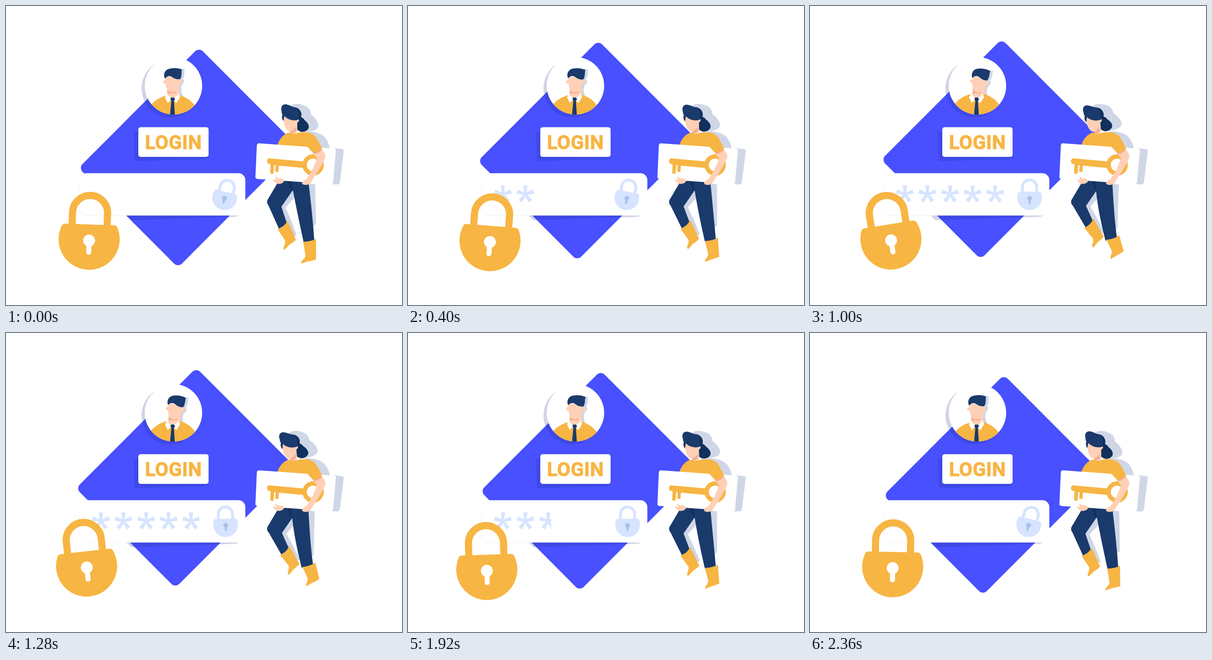
Recreate the animation shown at these times as an HTML page. Size 862 px wide and 650 px high, loop 2400 ms.

```html
<!DOCTYPE html>
<html lang="en">
<head>
<meta charset="utf-8">
<title>Login</title>
<style>
  html, body { margin: 0; width: 100%; height: 100%; overflow: hidden; background: #fff; }
  svg { display: block; width: 100%; height: 100%; }
  .shade { fill: #cfd6e6; }
  .cast { fill: rgba(20, 40, 120, .2); }
  .blue { fill: #4850ff; }
  .gold { fill: #f7b543; }
  .navy { fill: #1a3a6c; }
  .dark { fill: #10305d; }
  .skin { fill: #ffd0b5; }
  .blush { fill: #f8ab8a; }
  .white { fill: #fff; }
  .pale { fill: #d6e4ff; }
  .word { font: bold 42px Roboto, sans-serif; letter-spacing: .6px; stroke: #f7b543; stroke-width: 1; }
  #lock { color: #f7b543; --hole: #fff; }
  #mini { color: #d6e4ff; --hole: #a9c1ea; }
</style>
</head>
<body>
<svg viewBox="0 0 862 650">
  <defs>
    <clipPath id="disc"><circle cx="364.5" cy="173.5" r="62.5"/></clipPath>
    <clipPath id="typed"><rect id="reveal" x="170" y="380" width="0" height="60"/></clipPath>
    <g id="star" class="pale">
      <path id="arm" d="M-2.2 1L-4.6 -19H4.6L2.2 1Z"/>
      <use href="#arm" transform="rotate(72)"/>
      <use href="#arm" transform="rotate(144)"/>
      <use href="#arm" transform="rotate(216)"/>
      <use href="#arm" transform="rotate(288)"/>
    </g>
    <g id="padlock">
      <path d="M-38.2 -28V-56.5A38.2 38.2 0 0 1 38.2 -56.5V-28" fill="none" stroke="currentColor" stroke-width="15.5"/>
      <path d="M-53 -31.5H53Q59 -31.5 61 -26A66.5 66.5 0 1 1 -61 -26Q-59 -31.5 -53 -31.5Z" fill="currentColor"/>
      <g style="fill:var(--hole);stroke:var(--hole)">
        <circle cy="3.5" r="13" stroke="none"/>
        <path d="M0 8V29" stroke-width="11" stroke-linecap="round"/>
      </g>
    </g>
  </defs>

  <g id="tile">
    <rect class="blue" x="-153" y="-185.25" width="306" height="370.5" rx="12" transform="translate(397.25 329.25) rotate(45)"/>
  </g>

  <!-- avatar -->
  <circle class="cast" cx="358" cy="179" r="63"/>
  <circle class="white" cx="364.5" cy="173.5" r="62.5"/>
  <g clip-path="url(#disc)">
    <g id="face">
      <path class="shade" d="M360 137L389 137C387 144 390 152 385 159C390 162 387 169 383 171C380 178 381 188 386 196L392 215H362Z"/>
      <path class="skin" d="M351 176H377L377 198L363 206L351 198Z"/>
      <path class="blush" d="M351 181Q357 190 371 185L367 192H351Z"/>
      <circle class="skin" cx="346" cy="165.500" r="3.800"/>
      <circle class="skin" cx="379.500" cy="165.500" r="3.800"/>
      <path class="skin" d="M346 154L348 173Q351 188 362 188Q374 187 377 171L380 154Z"/>
      <path class="navy" d="M346 158C343 152 343 143 351 138C360 134 374 134 383 138C381 143 384 152 379 159C372 160 366 158 361 154C355 151 350 153 346 158Z"/>
    </g>
    <g id="suit">
      <path class="gold" d="M300 245C310 215 325 202 347 195L362 203L378 194C398 200 413 211 426 245Z"/>
    </g>
    <path class="skin" d="M351 190H376L363 203Z"/>
    <path class="white" d="M351 192L346 198L352 211L361 202L371 211L379 198L376 190Q371 198 363 200Q356 199 351 192Z"/>
    <path class="navy" d="M359 199H366L368 203L365.500 206L367.500 237H357L360 206L358 203Z"/>
  </g>

  <!-- button -->
  <path class="cast" d="M288 273L283 273Q279 274 279 278L281 337L434 333Q440 331 440 327L288 327Z"/>
  <rect class="white" x="288" y="263.500" width="153" height="64.500" rx="5"/>
  <text class="word gold" x="302.500" y="310.800">LOGIN</text>

  <!-- password field -->
  <path class="cast" d="M262 455L273 465.500L494 458.500Q505 458 509 454Z"/>
  <rect class="white" x="160" y="363.500" width="361" height="92" rx="15"/>
  <path d="M160 380V440Q160 455.500 176 455.500H262" fill="none" stroke="#eee" stroke-width=".8"/>
  <g clip-path="url(#typed)">
    <use href="#star" x="206.500" y="409"/>
    <use href="#star" x="255.500" y="409"/>
    <use href="#star" x="305" y="409"/>
    <use href="#star" x="354" y="409"/>
    <use href="#star" x="403" y="409"/>
  </g>
  <use id="mini" href="#padlock"/>

  <!-- woman: shadows and legs -->
  <path class="shade" d="M650 272C672 272 692 277 699 293Q703 300 705 310H680Z"/>
  <path class="shade" d="M713 309L731 311Q736 312 735 317L727 382Q726 388 720 388L706 387Z"/>
  <path class="shade" data-to="M655 385L672 388L669 480Q669 485 665 487L656 440Z" d="M655 385L673 388L675 472Q674 476 668 478L658 440Z"/>
  <path class="shade" d="M599 437L623 400L630 414L608 439Z"/>
  <g id="shin">
    <path class="shade" d="M599 435L608 437L621 467L633 499L622 500L605 462Z"/>
    <path class="navy" d="M569 425Q568 429 571 433L594 484L612 474L599 435Z"/>
    <path class="gold" d="M591 485Q605 481 613 467L631 508Q626 514 618 518L607 529Q602 530 605 522Q609 513 607 509Z"/>
  </g>
  <path class="navy" d="M595 378L569 422Q567 428 571 433L599 437L626 398V378Z"/>
  <path class="dark" d="M612 380H626L625 402L620 400Z"/>
  <path class="navy" data-to="M621 380L622 393Q625 440 643 510L668 503Q662 465 658 380Z" d="M621 380L623 393Q634 450 648 514L671 509Q667 450 658 380Z"/>
  <path class="gold" data-to="M645 508Q662 507 673 498L683 532Q677 538 669 541L655 550Q653 545 657 538L657 532Z" d="M647 512Q663 513 675 506L675 551Q667 554 658 555L642 560Q643 554 649 549L652 544Z"/>

  <!-- woman: head and torso -->
  <g id="head">
    <path class="shade" d="M620 217C628 211 640 212 650 217C658 219 664 227 664 236C672 242 680 252 680 260C679 268 672 271 663 272L640 275Z"/>
    <path class="dark" d="M633 243C639 237 647 243 650 248C658 254 661 262 658 267C651 276 640 275 633 268Z"/>
    <path class="skin" d="M620 262L634 250V272Q633 281 624 281Q616 280 616 276L622 273Z"/>
    <path class="blush" d="M618 272Q626 271 632 262L631 272Q626 277 619 277Z"/>
    <path class="skin" d="M605 236C602 252 607 269 616 272C623 272 630 264 633 254Q640 251 637 245Z"/>
    <path class="dark" d="M628 220C638 221 644 230 643 238C642 244 638 247 633 248L625 240Z"/>
    <path class="navy" d="M600 229C597 219 602 212 611 214C617 215 622 219 628 220C636 223 638 232 637 240Q637 246 633 248C625 250 613 247 606 239L604 250C600 246 600 239 602 236C600 234 600 232 600 229Z"/>
  </g>
  <path class="gold" d="M590 305C594 289 604 279 615 275Q625 281 638 275C655 273 668 275 676 287L688 309L668 321L650 312Z"/>

  <!-- card with key -->
  <path class="white" d="M551 298.500L655 306L714 310Q719 310 718 315L712 383Q711 388 706 387L547 376Q542 375 543 370L546 303Q547 298 551 298.500Z"/>
  <circle cx="668.500" cy="345.500" r="18.500" fill="none" stroke="#f7b543" stroke-width="9.500"/>
  <path class="gold" d="M571 331L649 338L646 352L594 347L593 361L586 360L587 346L584 346L582 365L575 364L576 344L571 343Q568 341 568 336Z"/>

  <!-- arm and hands -->
  <path class="skin" d="M668 320L686 311C693 317 696 324 695 330C688 347 674 367 664 383C660 390 650 390 645 387C643 382 648 380 654 376C662 367 672 346 677 331Z"/>
  <path class="blush" d="M667 318L687 309L688 313Q679 321 671 322Z"/>
  <path class="gold" d="M640 290L676 287L687 310Q679 317 668 319L656 306Z"/>
  <path class="skin" d="M580 378Q584 376 588 379L586 372C589 369 591 375 593 375C600 373 605 377 605 381C603 386 594 388 588 386Z"/>

  <use id="lock" href="#padlock"/>
</svg>
<script>
  const LOOP = 2400, STEP = 40;
  const $ = id => document.getElementById(id);
  const times = [0, 400, 720, 1000, 1600, 1920, 2360];
  const track = (...values) => values.map((v, i) => [times[i], v]);

  const sway = [[0, 0], [400, .33], [720, .68], [1000, .97], [1080, 1], [1160, .97], [1600, .62], [1920, .35], [2360, .04]];
  const tileX = track(0, -6, -1, -3, -8, -.5, 2);
  const tileY = [[0, 0], [400, -15], [720, -21], [1000, -18], [1160, -15], [1600, -13], [1920, -8], [2280, .3], [2360, 1]];
  const lockX = track(181, 178.5, 174.5, 176, 174, 171.5, 180);
  const lockY = [[0, 506.5], [400, 509.5], [560, 512], [720, 511], [1000, 506], [1600, 506.5], [1680, 509.5], [1800, 514], [1920, 513.5], [2280, 510], [2360, 507.5]];
  const lockTurn = track(2, 4.6, 2, -9, -2.5, -1.8, 1);
  const miniTurn = track(14, 10.5, 0, 0, -3, 0, 14);
  const typing = [[0, 175], [400, 280], [720, 403], [800, 430], [1540, 432], [1600, 413], [1920, 312], [2360, 174]];

  // Key before or after the list, wrapped around the loop
  function key(keys, i) {
    const n = keys.length, turn = Math.floor(i / n), [t, v] = keys[i - turn * n];
    return [t + turn * LOOP, v];
  }

  function segment(keys, t) {
    let i = keys.length - 1;
    while (keys[i][0] > t) i--;
    const a = key(keys, i), b = key(keys, i + 1);
    return { i, a, b, u: (t - a[0]) / (b[0] - a[0]) };
  }

  function linear(keys, t) {
    const { a, b, u } = segment(keys, t);
    return a[1] + (b[1] - a[1]) * u;
  }

  function smooth(keys, t) {
    const { i, a, b, u } = segment(keys, t);
    const p = key(keys, i - 1), n = key(keys, i + 2), span = b[0] - a[0];
    const rise = (k, m) => (m[1] - k[1]) / (m[0] - k[0]);
    // A tangent is flat at peaks and limited by the gentler side
    const slope = (k, m, q) => {
      const l = rise(k, m), r = rise(m, q);
      return l * r <= 0 ? 0 : 2 * l * r / (l + r);
    };
    const ma = slope(p, a, b) * span, mb = slope(a, b, n) * span, d = b[1] - a[1];
    return a[1] + u * (ma + u * (3 * d - 2 * ma - mb + u * (ma + mb - 2 * d)));
  }

  const number = /-?\d+(\.\d+)?/g;
  const morphs = [...document.querySelectorAll('[data-to]')].map(el => ({
    el, from: el.getAttribute('d'), to: el.dataset.to.match(number).map(Number)
  }));

  const place = (id, value) => $(id).setAttribute('transform', value);

  function draw(t) {
    const p = smooth(sway, t), mini = smooth(miniTurn, t);
    place('tile', `translate(${smooth(tileX, t)} ${smooth(tileY, t)})`);
    place('lock', `translate(${smooth(lockX, t)} ${smooth(lockY, t)}) rotate(${smooth(lockTurn, t)})`);
    place('mini', `translate(${478 - mini / 7} 416.5) rotate(${mini}) scale(.405)`);
    place('face', `rotate(${8 * p} 362 210)`);
    place('suit', `translate(0 ${-3 * p})`);
    place('head', `rotate(${-5.8 * p} 630 275)`);
    place('shin', `rotate(${-6.3 * p} 571 428)`);
    $('reveal').setAttribute('width', Math.max(0, linear(typing, t) - 170));
    for (const { el, from, to } of morphs) {
      let i = 0;
      el.setAttribute('d', from.replace(number, v => +v + (to[i++] - v) * p));
    }
  }

  function tick() {
    draw(Math.floor(performance.now() % LOOP / STEP) * STEP);
    requestAnimationFrame(tick);
  }
  tick();
</script>
</body>
</html>
```
